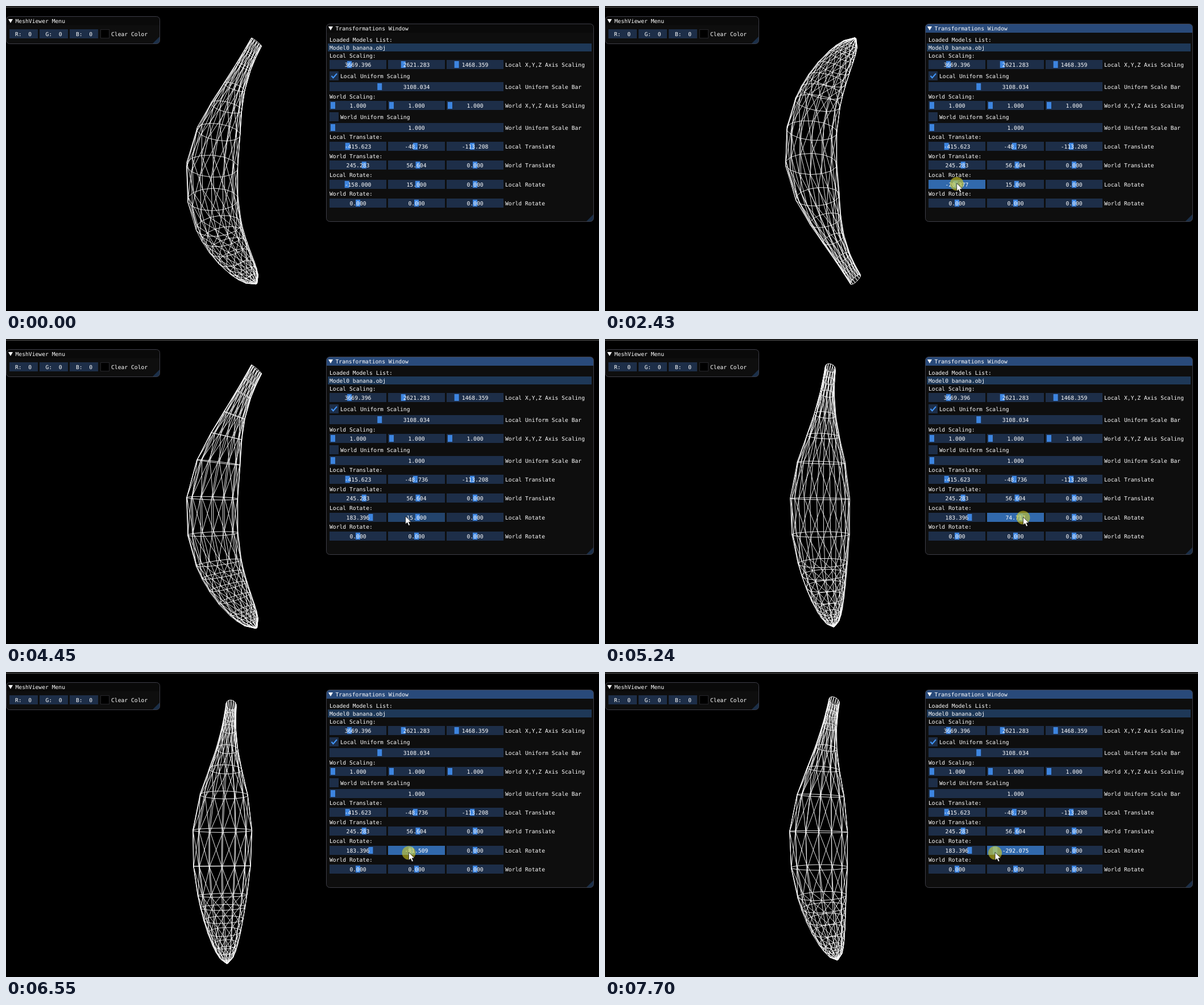
Write an HTML page with a canvas that moves like this. It is 1043x537 px and loops after 8000 ms.

```html
<!DOCTYPE html>
<html lang="en">
<head>
<meta charset="utf-8">
<title>Mesh viewer</title>
<style>
html, body { margin: 0; width: 100%; height: 100%; overflow: hidden; background: #000; }
canvas { display: block; }
</style>
</head>
<body>
<canvas id="stage" width="1043" height="537"></canvas>
<script>
const ctx = document.getElementById('stage').getContext('2d');
const LOOP = 8000, SEGMENTS = 14, RING_COUNT = 16, DEG = Math.PI / 180;
const STEP = 720 / 106, STEP_PX = 0.835;   // one drag step in degrees and in pixels
const PRESS_X = 1770, RELEASE_X = 4000, PRESS_Y = 4700, LAG = 90;
const PIVOT = { x: 384, y: 278 };
const SCALE = [1, 11111], SHIFT = [-1000, 1000], ANGLE = [-360, 360];
const COLOR = {
  frame: '#1d2e48', hover: '#23446c', active: '#3169ac',
  grab: '#3d85e0', grabActive: '#4296fa', grip: '#1b2f49', selected: '#1e3857',
  panel: '#0e0e0e', border: '#3e3e47', title: '#0a0a0a', titleActive: '#294a7a'
};

// Drag positions as [ms, steps]
const dragX = [[1720, -23], [2570, 1], [3040, 16], [3210, 16], [3960, 27]];
const dragY = [[4700, 2], [5240, 11], [5590, 31], [5660, 31], [6550, -12],
  [7150, -40], [7420, -40], [7700, -43]];
// Height of the mesh rings as [ring, y]
const ringHeights = [[0, 54], [2, 98], [4, 171], [5, 217], [7, 343], [8, 394], [12, 478], [15, 510]];

const clamp01 = v => Math.min(1, Math.max(0, v));
const progress = (t, from, to) => clamp01((t - from) / (to - from));
const mix = (a, b, u) => a + (b - a) * u;

function track(keys, t) {
  const i = keys.findIndex(key => key[0] > t);
  if (i === 0) return keys[0][1];
  if (i < 0) return keys[keys.length - 1][1];
  const [a, b] = [keys[i - 1], keys[i]];
  return mix(a[1], b[1], progress(t, a[0], b[0]));
}

// A curved spindle: thin stem above, round belly, pointed end below
function makeRing(k) {
  const y = track(ringHeights, k), e = y - 300, d = Math.abs(e);
  const bend = e < 0 ? 80 * (d / 246) ** 1.7 : 78 * (d / 210) ** 2.3;
  const radius = e < 0
    ? 8 + 37.5 * Math.exp(-((d / 151) ** 2.6))
    : 45.5 * (1 - (d / 210.2) ** 2) ** 0.58;
  const depth = radius * (1 + 0.18 * Math.exp(-((d / 130) ** 2)));
  const tilt = -0.0012 * e - 4e-8 * e ** 3;
  const cx = (361.5 + bend - PIVOT.x) / Math.cos(15 * DEG), cy = y - PIVOT.y;
  return Array.from({ length: SEGMENTS }, (_, j) => {
    const phi = (j + 0.25) / SEGMENTS * 2 * Math.PI;
    const side = radius * Math.cos(phi);
    return [cx + side, cy + side * tilt, depth * Math.sin(phi) + cy * 0.015];
  });
}
const rings = Array.from({ length: RING_COUNT }, (_, k) => makeRing(k));

function drawMesh(rotX, rotY) {
  const a = (rotX - 180) * DEG, b = rotY * DEG;
  const ca = Math.cos(a), sa = Math.sin(a), cb = Math.cos(b), sb = Math.sin(b);
  const pts = rings.map(ring => ring.map(([x, y, z]) => [
    PIVOT.x + x * cb + z * sb,
    PIVOT.y + y * ca + (z * cb - x * sb) * sa
  ]));
  const line = (p, q) => { ctx.moveTo(...p); ctx.lineTo(...q); };
  ctx.beginPath();
  pts.forEach((ring, k) => ring.forEach((p, j) => {
    const next = (j + 1) % SEGMENTS, below = pts[k + 1];
    line(p, ring[next]);
    if (below) {
      line(p, below[j]);
      line(p, below[next]);
    }
  }));
  ctx.lineWidth = 0.9;
  ctx.strokeStyle = '#fff';
  ctx.stroke();
}

function rect(x, y, w, h, color) {
  ctx.fillStyle = color;
  ctx.fillRect(x, y, w, h);
}

function polygon(points, color) {
  ctx.beginPath();
  points.forEach(p => ctx.lineTo(...p));
  ctx.closePath();
  ctx.fillStyle = color;
  ctx.fill();
}

function text(str, x, y, align = 'left') {
  ctx.textAlign = align;
  ctx.fillStyle = '#fff';
  ctx.fillText(str, x, y + 4);
}

function panel(x, y, w, h, title, titleColor) {
  const outline = new Path2D();
  outline.roundRect(x + 0.5, y + 0.5, w - 1, h - 1, 6);
  ctx.save();
  ctx.clip(outline);
  rect(x, y, w, h, COLOR.panel);
  rect(x, y, w, 16, titleColor);
  polygon([[x + w, y + h], [x + w - 14, y + h], [x + w, y + h - 14]], COLOR.grip);
  ctx.restore();
  ctx.lineWidth = 1;
  ctx.strokeStyle = COLOR.border;
  ctx.stroke(outline);
  polygon([[x + 4, y + 5], [x + 12, y + 5], [x + 8, y + 12]], '#fff');
  text(title, x + 16.5, y + 8);
}

function slider(x, y, w, value, [min, max], state = 'frame') {
  const grabX = x + 6 + (w - 12) * (value - min) / (max - min);
  rect(x, y - 8, w, 16, COLOR[state]);
  rect(grabX - 4, y - 6, 8, 12, state === 'active' ? COLOR.grabActive : COLOR.grab);
  text(value.toFixed(3), x + w / 2, y, 'center');
}

function sliderRow(y, label, values, range, states = []) {
  values.forEach((v, i) => slider(569 + 103 * i, y, 100, v, range, states[i]));
  text(label, 878, y);
}

function checkbox(y, label, checked) {
  rect(569, y - 8, 16, 16, COLOR.frame);
  if (checked) {
    ctx.beginPath();
    ctx.moveTo(572.5, y);
    ctx.lineTo(575.5, y + 3.5);
    ctx.lineTo(582, y - 4);
    ctx.lineWidth = 2;
    ctx.strokeStyle = COLOR.grabActive;
    ctx.stroke();
  }
  text(label, 588, y);
}

function scalingBlock(y, space, values, uniform, checked) {
  text(`${space} Scaling:`, 569, y);
  sliderRow(Math.round(y + 16.4), `${space} X,Y,Z Axis Scaling`, values, SCALE);
  checkbox(y + 36, `${space} Uniform Scaling`, checked);
  slider(569, y + 55, 306, uniform, SCALE);
  text(`${space} Uniform Scale Bar`, 878, y + 55);
}

function drawMenu() {
  panel(0, 18, 271, 49, 'MeshViewer Menu', COLOR.title);
  ['R', 'G', 'B'].forEach((name, i) => {
    rect(6 + 53 * i, 41, 50, 16, COLOR.frame);
    text(name + ':  0', 30.5 + 53.5 * i, 49, 'center');
  });
  rect(166, 41, 16, 16, '#26262a');
  rect(167, 42, 14, 14, '#000');
  text('Clear Color', 185, 49);
}

function drawTransforms(rotX, rotY, states, focused) {
  panel(563, 31, 471, 349, 'Transformations Window', focused ? COLOR.titleActive : COLOR.title);
  text('Loaded Models List:', 569, 59);
  rect(566, 66, 464, 14, COLOR.selected);
  text('Model0 banana.obj', 569, 73);
  scalingBlock(87, 'Local', [3669.396, 2621.283, 1468.359], 3108.034, true);
  scalingBlock(159, 'World', [1, 1, 1], 1, false);
  [
    ['Local Translate', [-415.623, -48.736, -113.208], SHIFT],
    ['World Translate', [245.283, 56.604, 0], SHIFT],
    ['Local Rotate', [rotX, rotY, 0], ANGLE, states],
    ['World Rotate', [0, 0, 0], ANGLE]
  ].forEach(([label, values, range, rowStates], i) => {
    const y = 230.3 + 33.3 * i;
    text(label + ':', 569, Math.round(y));
    sliderRow(Math.round(y + 16.6), label, values, range, rowStates);
  });
}

function cursorAt(t) {
  if (t < PRESS_X) {
    const u = progress(t, 70, 840), ease = u * (2 - u);
    return [mix(925, 600, ease), mix(490, 315, ease)];
  }
  const y = mix(312, 317.5, progress(t, PRESS_Y, 6550));
  if (t < RELEASE_X) return [619 + track(dragX, t + LAG) * STEP_PX, y];
  if (t < PRESS_Y) {
    return [mix(642, 724, 1 - (1 - progress(t, RELEASE_X, PRESS_Y)) ** 1.3), y];
  }
  return [722 + track(dragY, t + LAG) * STEP_PX, y];
}

function drawCursor(t, x, y) {
  if ((t >= 900 && t < RELEASE_X) || t >= PRESS_Y) {
    ctx.globalAlpha = progress(t, 870, 1030);
    ctx.beginPath();
    ctx.arc(x, y + 1, 12, 0, 2 * Math.PI);
    ctx.fillStyle = 'rgba(215,208,35,0.58)';
    ctx.fill();
    ctx.globalAlpha = 1;
  }
  const arrow = [[0, 0], [0, 14], [3.2, 11], [5.5, 16.5], [8, 15.5], [5.7, 10.2], [10, 10.2]];
  polygon(arrow.map(([dx, dy]) => [x + dx, y + dy]), '#fff');
  ctx.lineWidth = 0.7;
  ctx.strokeStyle = '#000';
  ctx.stroke();
}

function sliderStates(t, x) {
  if (t < PRESS_X) return [];
  if (t < RELEASE_X) return ['active'];
  if (t >= PRESS_Y) return ['frame', 'active'];
  return x < 669 ? ['hover'] : ['frame', x < 672 ? 'frame' : 'hover'];
}

function draw(t) {
  rect(0, 0, 1043, 537, '#000');
  rect(0, 1, 1043, 2, '#3a3a3a');
  ctx.font = '9.7px "DejaVu Sans Mono", monospace';
  ctx.textRendering = 'geometricPrecision';

  const rotX = t < PRESS_X ? -158 : Math.round(track(dragX, t)) * STEP;
  const rotY = t < PRESS_Y ? 15 : Math.round(track(dragY, t)) * STEP;
  const [x, y] = cursorAt(t);

  drawMesh(rotX, rotY);
  drawMenu();
  drawTransforms(rotX, rotY, sliderStates(t, x), t >= 1880);
  if (t >= 70) drawCursor(t, x, y);
}

function tick() {
  draw(performance.now() % LOOP);
  requestAnimationFrame(tick);
}
tick();
</script>
</body>
</html>
```
